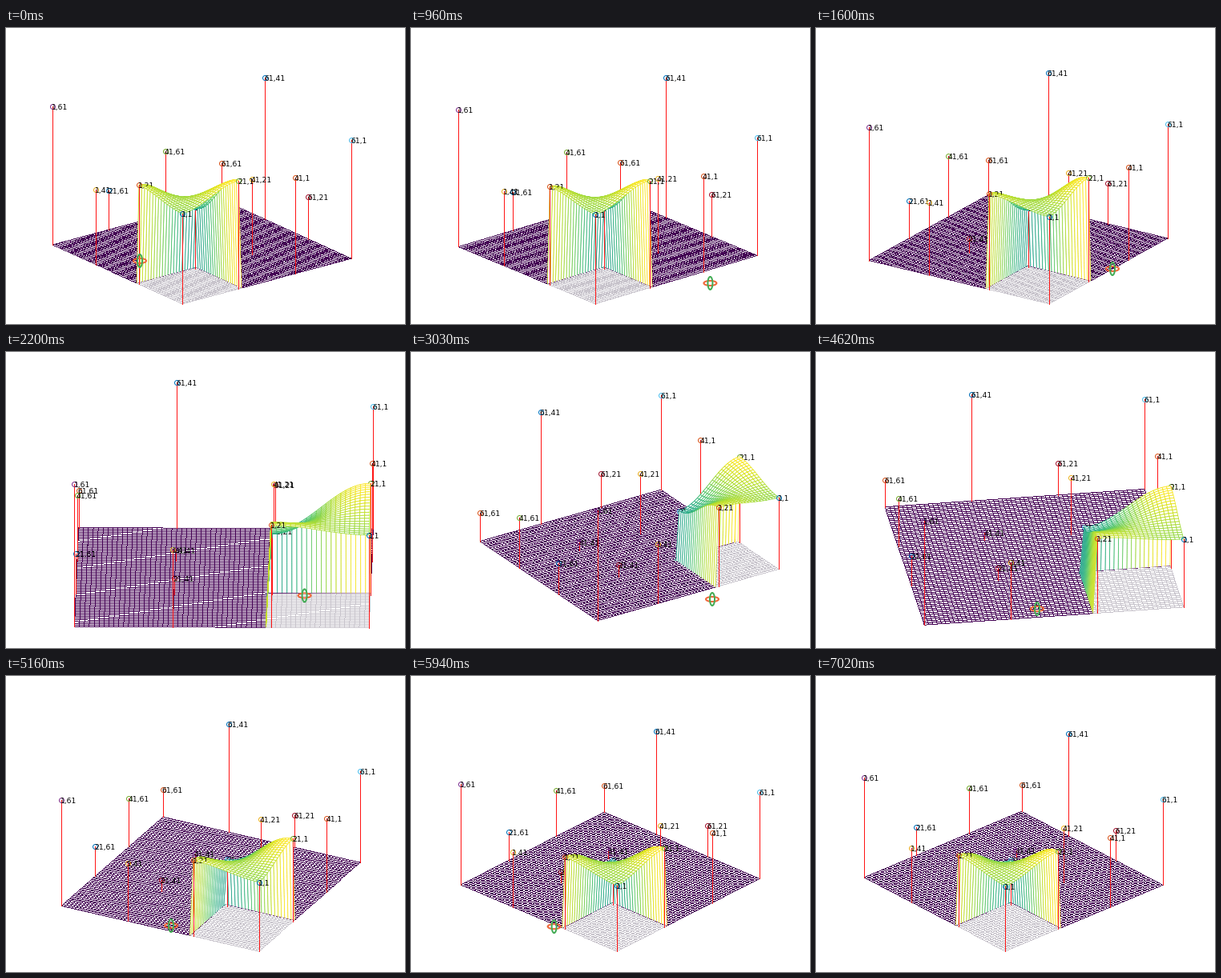
Animation, 498 px wide and 370 px high, one loop 7700 ms. Source, as a matplotlib script:

```python
import numpy as np
import matplotlib.pyplot as plt
from matplotlib.animation import FuncAnimation
from matplotlib.collections import PolyCollection
from matplotlib.colors import to_rgb
from matplotlib.patches import Ellipse

WIDTH, HEIGHT, DPI = 498, 370, 100
LOOP, STEP = 7700, 50
PX = 72 / DPI  # one pixel in points

CENTER = np.array([247.75, 177.0])
BOX_W, BOX_H = 435, 340
LIMIT = 70  # x and y axes run from 0 to this
LAST, PATCH, SPACING = 61, 21, 20  # mesh size, raised corner, node distance

ORDER = ["#0072bd", "#d95319", "#edb120", "#7e2f8e",
         "#77ac30", "#4dbeee", "#a2142f"]
TICKS = range(1, LAST + 1, SPACING)
LEVELS = np.array([[60, 66, 50, 92], [72, 41, 10, 26],
                   [64, 50, 7, 42], [79, 28, 94, 24]]) / 100

# Time, azimuth, elevation: two long drags with a short rest between them.
VIEW = [(840, 37.5, 30), (1600, 56.5, 32.3), (2380, 99, 38),
        (3000, 123, 42.7), (3650, 149.9, 40.6), (4050, 149.9, 40.6),
        (4600, 98.6, 50.8), (5150, 62.9, 45.3), (5580, 51, 46),
        (6410, 41.9, 46.8)]

# Time, x, y: the pointer runs ahead of the view, then leaves at the bottom.
POINTER = [(0, 167, 291), (660, 374, 322), (840, 374, 322),
           (1600, 370, 301), (3000, 376, 309), (3650, 424, 300),
           (4050, 424, 300), (4600, 276, 321), (5150, 206, 312),
           (6410, 160, 314), (6780, 160, 314), (7000, 377, 366)]


def at(keys, t):
    times, *values = zip(*keys)
    return [np.interp(t, times, v) for v in values]


class Camera:
    """Orthographic view stretched to fill the axes box."""

    def __init__(self, azimuth, elevation):
        a, e = np.radians([azimuth, elevation])
        self.ca, self.sa = np.cos(a), np.sin(a)
        self.ce, self.se = np.cos(e), np.sin(e)
        span = abs(self.ca) + abs(self.sa)
        self.sx = BOX_W / span
        self.sy = BOX_H / (self.se * span + self.ce)

    def depth(self, x, y):
        return (x / LIMIT - .5) * self.sa + (y / LIMIT - .5) * self.ca

    def project(self, p):
        x, y, z = np.moveaxis(np.asarray(p, float), -1, 0)
        side = (x / LIMIT - .5) * self.ca - (y / LIMIT - .5) * self.sa
        up = self.se * self.depth(x, y) + self.ce * (z - .5)
        return np.stack([CENTER[0] + self.sx * side,
                         CENTER[1] - self.sy * up], axis=-1)


def patch_height(x, y):
    """Cosine interpolation between the four corner nodes."""
    if max(x, y) > PATCH:
        return 0.0
    u, v = [(1 - np.cos(np.pi * (s - 1) / SPACING)) / 2 for s in (x, y)]
    return np.array([1 - u, u]) @ LEVELS[:2, :2] @ np.array([1 - v, v])


def build_patch():
    """Sheet cells are closed outlines; wall cells stay open at the floor."""
    cells = []
    for i in range(1, PATCH + 1):
        for j in range(1, PATCH + 1):
            a, b, c, d = (i, j), (i + 1, j), (i + 1, j + 1), (i, j + 1)
            if i == PATCH:
                path = [b, a, d, c, c]
            elif j == PATCH:
                path = [d, a, b, c, c]
            else:
                path = [a, b, c, d, a]
            cells.append([(x, y, patch_height(x, y)) for x, y in path])
    return np.array(cells)


def build_floor():
    outer, inner = [], []
    edge = PATCH + 1
    for i in range(1, LAST + 1):
        start = edge if i < edge else 1
        outer += [[(i, start, 0), (i, LAST, 0)], [(start, i, 0), (LAST, i, 0)]]
        if i < edge:
            inner += [[(i, 1, 0), (i, edge, 0)], [(1, i, 0), (edge, i, 0)]]
    return np.array(outer), np.array(inner)


def hard_lines(canvas, segments, color):
    """Lines one pixel wide with hard edges."""
    for p, q in segments:
        n = int(np.ceil(abs(q - p).max()))
        s = (np.arange(n) + .5)[:, None] / n
        x, y = (p + (q - p) * s).astype(int).T
        canvas[y, x] = color


cells = build_patch()
mid = cells[:, :4, :2].mean(axis=1)
top = cells[:, :, 2].max(axis=1)
cell_colors = plt.get_cmap("viridis")(top / top.max())
outer, inner = build_floor()
nodes = np.array([(x, y) for x in TICKS for y in TICKS], float)
bases = np.column_stack([nodes, np.zeros(len(nodes))])
tips = np.column_stack([nodes, LEVELS.ravel()])

fig = plt.figure(figsize=(WIDTH / DPI, HEIGHT / DPI), dpi=DPI,
                 facecolor="white")
ax = fig.add_axes([0, 0, 1, 1])
floor = ax.imshow(np.ones((HEIGHT, WIDTH, 3)), extent=(0, WIDTH, HEIGHT, 0),
                  aspect="auto", interpolation="nearest", zorder=0)
ax.set_xlim(0, WIDTH)
ax.set_ylim(HEIGHT, 0)
ax.axis("off")

layers = []
for k in range(len(nodes) + 1):
    layer = PolyCollection([], facecolors="white", linewidths=.8 * PX,
                           zorder=2 * k + 1)
    layers.append(ax.add_collection(layer, autolim=False))

stems, rings, labels = [], [], []
for k, (x, y) in enumerate(nodes):
    stems += ax.plot([], [], color="#ff1414", lw=PX)
    rings += ax.plot([], [], "o", ms=6 * PX, mfc="none", mew=PX,
                     mec=ORDER[k % len(ORDER)])
    labels.append(ax.text(0, 0, f"{x:.0f},{y:.0f}", family="DejaVu Sans",
                          size=9.2 * PX, color="black", va="baseline"))

pointer = [ax.add_patch(Ellipse((0, 0), w, h, fill=False, ec=c, lw=2 * PX,
                                zorder=100))
           for w, h, c in ((16, 6, "#f0683a"), (6, 16, "#43ac55"))]


def draw(frame):
    t = frame * STEP
    cam = Camera(*at(VIEW, t))
    canvas = np.ones((HEIGHT, WIDTH, 3))
    hard_lines(canvas, cam.project(inner), to_rgb("#c8c4cc"))
    hard_lines(canvas, cam.project(outer), to_rgb("#440154"))
    floor.set_data(canvas)

    # Paint back to front, with the stems slotted between mesh layers.
    node_depth = cam.depth(*nodes.T) - .005
    order = np.argsort(-node_depth)
    cell_depth = cam.depth(*mid.T)
    slot = np.searchsorted(-node_depth[order], -cell_depth)
    flat = cam.project(cells)
    for k, layer in enumerate(layers):
        picked = np.flatnonzero(slot == k)
        picked = picked[np.argsort(-cell_depth[picked])]
        layer.set_visible(len(picked) > 0)
        if len(picked):
            layer.set_verts(flat[picked], closed=False)
            layer.set_edgecolor(cell_colors[picked])

    low, high = cam.project(bases), cam.project(tips)
    for rank, n in enumerate(order):
        (x, y0), y1 = low[n], high[n, 1]
        stems[n].set_data([x, x], [y0, y1])
        rings[n].set_data([x], [y1])
        labels[n].set_position((x - 1, y1 + 4))
        for step, part in enumerate((stems[n], rings[n], labels[n])):
            part.set_zorder(2 * rank + 2 + step / 10)

    for part in pointer:
        part.set_center(at(POINTER, t))
        part.set_visible(t < POINTER[-1][0])
    return []


anim = FuncAnimation(fig, draw, frames=LOOP // STEP, interval=STEP,
                     repeat=True, repeat_delay=0, blit=False)
plt.show()
```
